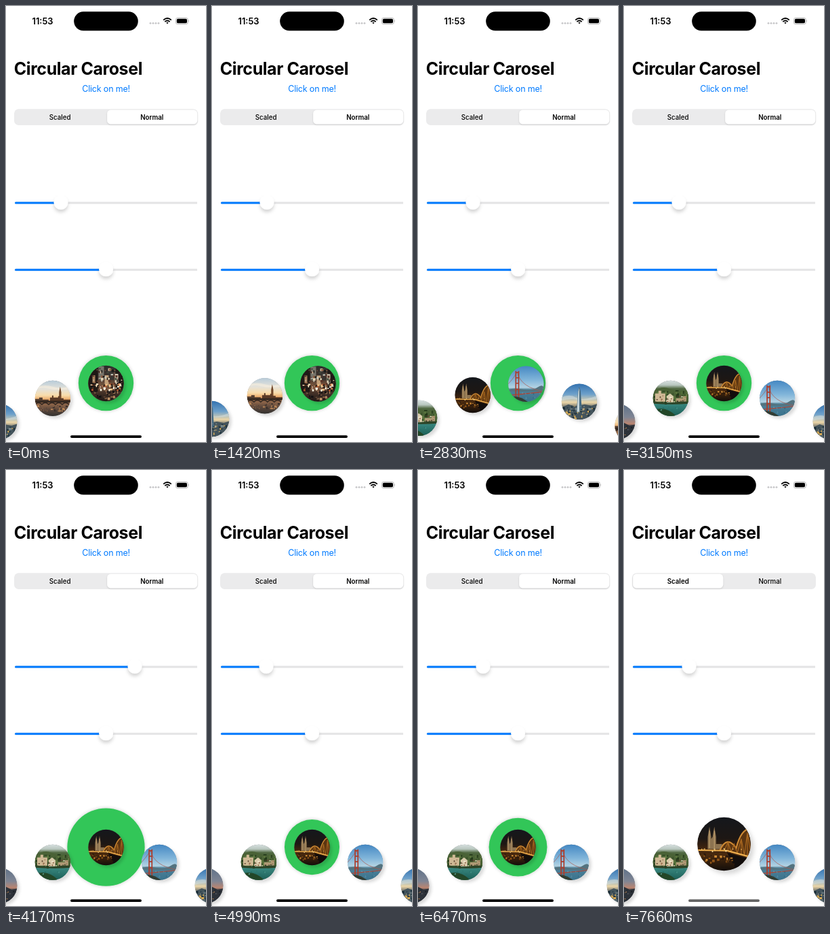
An HTML page that plays this animation: 295 by 640 pixels, repeating every 8 s.

```html
<!DOCTYPE html>
<html lang="en">
<head>
<meta charset="utf-8">
<title>Circular carousel</title>
<style>
  html, body { margin: 0; width: 100%; height: 100%; overflow: hidden; background: #fff; }
  svg { display: block; width: 100vw; height: 100vh; font-family: Inter, Roboto, sans-serif; }
  .title { font-size: 25px; font-weight: 700; letter-spacing: -.43px; }
  .link { font-size: 12.5px; letter-spacing: -.18px; fill: #007aff; }
  .clock { font-size: 12.9px; font-weight: 600; }
  .label { font-size: 9.75px; }
  .mid { text-anchor: middle; }
</style>
</head>
<body>
<svg id="stage" viewBox="0 0 295 640" preserveAspectRatio="none">
  <defs>
    <clipPath id="disc"><circle r="26.2"/></clipPath>
    <filter id="cast" x="-40%" y="-40%" width="180%" height="180%">
      <feDropShadow dx="3.5" dy="3.5" stdDeviation="2.2" flood-opacity=".15"/>
    </filter>
    <filter id="halo" x="-30%" y="-30%" width="160%" height="160%">
      <feDropShadow dx="0" dy="0" stdDeviation="2.6" flood-opacity=".22"/>
    </filter>
    <filter id="lift" x="-60%" y="-60%" width="220%" height="240%">
      <feDropShadow dx="0" dy="4" stdDeviation="2.8" flood-opacity=".17"/>
    </filter>
    <filter id="thin" x="-10%" y="-30%" width="120%" height="170%">
      <feDropShadow dx="0" dy="1" stdDeviation="1" flood-opacity=".16"/>
    </filter>
  </defs>

  <text class="clock mid" x="54" y="27">11:53</text>
  <rect x="100.2" y="8.3" width="94.6" height="28" rx="14"/>
  <g fill="#c6c6c8">
    <circle cx="213" cy="25.3" r="1.4"/><circle cx="217" cy="25.3" r="1.4"/>
    <circle cx="221" cy="25.3" r="1.4"/><circle cx="225" cy="25.3" r="1.4"/>
  </g>
  <g fill="none" stroke="#000" stroke-width="1.9">
    <path d="M232.2 20.6Q238 15.5 243.8 20.6"/>
    <path d="M234.3 23.1Q238 19.9 241.7 23.1"/>
    <path d="M236.3 24.4L238 26.3L239.7 24.4Q238 23 236.3 24.4Z" fill="#000" stroke="none"/>
  </g>
  <rect x="250.4" y="17.4" width="18" height="9.3" rx="2.9" fill="none" stroke="#a5a5a5" stroke-width=".8"/>
  <rect x="251.8" y="18.8" width="15.2" height="6.5" rx="1.7"/>
  <path d="M269.5 20.5q1.6 1.5 0 3z" fill="#a5a5a5"/>

  <text class="title" x="11.8" y="100.9">Circular Carosel</text>
  <text class="link mid" x="147.6" y="125.5">Click on me!</text>

  <rect x="12" y="151.2" width="271" height="23.8" rx="6.6" fill="#ebebec"/>
  <rect id="thumb" y="152.6" width="133" height="20.6" rx="5.3" fill="#fff" filter="url(#thin)"/>
  <text id="scaled" class="label mid" x="79.7" y="166.7">Scaled</text>
  <text id="normal" class="label mid" x="215.3" y="166.7">Normal</text>

  <g id="sliders"></g>
  <circle id="green" cx="147.5" cy="553.6" fill="#33c658" filter="url(#halo)"/>
  <g id="items"></g>
  <rect id="home" x="95" y="630.2" width="105" height="3.7" rx="1.85"/>
</svg>
<script>
const LOOP = 8000;
const BLUE = '#007aff';
const GAP = 78.6;
const $ = id => document.getElementById(id);
const set = (el, attrs) => { for (const k in attrs) el.setAttribute(k, attrs[k]); };
const rect = (x, y, w, h, fill) => `<rect x="${x}" y="${y}" width="${w}" height="${h}" fill="${fill}"/>`;
const path = (d, fill) => `<path d="${d}" fill="${fill}"/>`;
const line = (d, stroke, width) => `<path d="${d}" fill="none" stroke="${stroke}" stroke-width="${width}"/>`;

let gradients = 0;
function backdrop(...stops) {
  const id = 'bg' + gradients++;
  const marks = stops.map(([at, color]) => `<stop offset="${at}" stop-color="${color}"/>`).join('');
  return `<linearGradient id="${id}" x2="0" y2="1">${marks}</linearGradient>` +
    rect(-27, -27, 54, 54, `url(#${id})`);
}

let seed = 11;
const rand = () => (seed = seed * 16807 % 2147483647) / 2147483647;
function scatter(count, x, y, w, h, size, colors) {
  let out = '';
  for (let i = 0; i < count; i++) {
    out += rect((x + rand() * w).toFixed(1), (y + rand() * h).toFixed(1),
      (.6 + rand() * size).toFixed(1), (.6 + rand() * size).toFixed(1),
      colors[Math.floor(rand() * colors.length)]);
  }
  return out;
}

// Small landscapes, left to right along the carousel.
const scenes = [
  // city at dusk
  backdrop([0, '#5d7087'], [.38, '#7f8594'], [.56, '#bb8570'], [.62, '#4b464b'], [1, '#1d2128']) +
    path('M-27 8L-10 4L0 7L10 2L18 6L27 4V27H-27Z', '#2d3239') +
    scatter(34, -24, 6, 48, 16, 1.2, ['#c78950', '#57575f', '#171c23']),

  // old houses above a lake
  backdrop([0, '#dbe3e4'], [.14, '#b9c7bf'], [.24, '#4f6740'], [.58, '#3f5930'], [.63, '#3b8a82'], [1, '#1a5c54']) +
    path('M-27 -10Q-12 -19 -2 -14T27 -12V6H-27Z', '#4a6236') +
    scatter(60, -26, -12, 52, 17, 4, ['#2c4220', '#5f7a40', '#3b5429', '#223819']) +
    path('M-23 -7h5v-4h4v4h6v12h-15z', '#cfb995') + path('M-6 -3L-1 -7L4 -3V6H-6Z', '#d9cbab') +
    path('M8 0h10v-3h5v9H8z', '#b09a76') +
    scatter(30, -24, -5, 48, 11, 2, ['#5d4632', '#efe4cb', '#8e6244', '#3a3b24']) +
    path('M-27 4Q-10 8 5 6T27 5V8Q5 10 -27 8Z', '#2d4427') +
    path('M-27 17Q-12 13 -3 18T8 27H-27Z', '#234728') +
    scatter(12, -16, 10, 36, 9, 1.6, ['#62aaa1', '#257067']),

  // cathedral and lit bridge at night
  backdrop([0, '#14171c'], [.4, '#1d1714'], [.55, '#3a210f'], [.7, '#4a2a0e'], [1, '#100c0a']) +
    path('M-16 5V-7L-14.3 -17L-12.6 -7V-5L-11.2 -7L-9.5 -17L-7.8 -7V0H-2V5Z', '#8d7350') +
    line('M-14.3 -13V4M-9.5 -13V4', '#c3a271', .7) +
    path('M-4 6Q3 -9 12 3Q17 -16 27 -15V13Z', '#5b3511') +
    line('M-4 6Q3 -9 12 4Q17 -16 27 -15', '#cf8a34', 1.4) +
    line('M0 7L4 -2L7 8L10 0L13 9L17 -5L20 11L23 -11L27 12M4 -2V7M17 -5V10M23 -11V12', '#a8671f', .8) +
    line('M-26 6L3 6.5L27 13', '#f0b04e', 1.5) + path('M3 8.5L27 15V27H13Z', '#120d0b') +
    scatter(42, -25, 8, 34, 11, 2, ['#8f5418', '#cf8a34', '#2a180d', '#51300f']) +
    scatter(10, -25, 4, 46, 4, 1, ['#ffe4a0', '#ffca6a']),

  // red suspension bridge
  backdrop([0, '#4286c2'], [.4, '#82b6da'], [.6, '#b3d3e3'], [.65, '#4f8199'], [1, '#38728c']) +
    path('M-27 9Q-19 5 -5 8T17 5T27 7V11H-27Z', '#54737f') +
    line('M-27 1Q-21 -5 -13 -17Q-7 6 27 11', '#a85a50', .7) +
    line('M-27 17L27 11.5', '#a8483a', 1.4) +
    line('M-15 -19V22M-10.8 -19V21', '#ab3d2d', 1.7) +
    line('M-15 -17h4.4M-15 -9h4.4M-15 -1h4.4M-15 8h4.4', '#ab3d2d', 1.7) +
    path('M-27 20Q-14 16 -4 22L4 27H-27Z', '#323d33') +
    scatter(12, -8, 12, 32, 9, 1.6, ['#6797a9', '#2e637c']),

  // glass tower over a town
  backdrop([0, '#2f6fae'], [.3, '#6ea1cb'], [.52, '#ecd6a8'], [.62, '#8b8878'], [1, '#233641']) +
    path('M-27 -6Q-14 -12 -5 -6T27 -9V-4Q10 -1 -3 -3T-27 -1Z', '#d6dfe088') +
    path('M-27 9L-16 4L-7 7L8 4L18 6L27 3V27H-27Z', '#44545c') +
    path('M-4 16L-2 -15L0 -22L2 -15L4 16Z', '#476b82') + path('M-3.5 15L-1.5 -15L0 -20V15Z', '#c9d8dc') +
    scatter(75, -26, 6, 52, 18, 3, ['#253944', '#dcae55', '#7b8b8f', '#182b36', '#b4a684']),

  // river at sunset
  backdrop([0, '#b5cad9'], [.25, '#e4e2da'], [.42, '#f8dcab'], [.54, '#eaa866'], [.6, '#a5734f'], [.8, '#5d483c'], [1, '#30302f']) +
    path('M-27 -16Q-12 -21 0 -17T27 -18V-14Q9 -11 -5 -14T-27 -12Z', '#fff3dc77') +
    path('M9.4 5V-9L11 -17L12.6 -9V5Z', '#6f4629') +
    path('M-4 5V-1h3v-3h2v3h7v-2h2v3h6v2h11v3z', '#5a3a26') +
    path('M-27 5V1h7V-1h5v3h9v3z', '#523d30') + rect(-27, 3.6, 54, 2.8, '#33271f') +
    line('M-26 9Q-21 4 -16 9Q-11 4 -6 9Q-1 4 4 9Q9 4 14 9Q19 4 24 9', '#302620', 1.6) +
    scatter(30, -24, 10, 48, 9, 3, ['#b98556', '#43372f', '#8a6548', '#332c29']),

  // neon street at night
  backdrop([0, '#2b2c2c'], [.35, '#41342d'], [.6, '#8a5f42'], [.72, '#4a352a'], [1, '#1d1715']) +
    path('M-27 -27H-12V12H-27ZM14 -27H27V12H14Z', '#1f1916') +
    rect(-11, -25, 8, 20, '#77756b') + rect(2, -23, 9, 18, '#383532') +
    rect(-2, -12, 6, 14, '#c4a27b') + rect(13, -14, 5, 13, '#d9cdb5') + rect(-20, -12, 4, 11, '#a8805c') +
    scatter(70, -25, -23, 48, 26, 3.4, ['#e6d5b5', '#8c5d42', '#171816', '#c9c8ba', '#5b3529', '#43503f']) +
    scatter(48, -24, 0, 46, 9, 3, ['#fff0cc', '#f3c184', '#b3552f', '#f6f2e0', '#1c1512']) +
    scatter(36, -23, 10, 44, 12, 3.4, ['#141112', '#8e6549', '#352a26', '#bd9166'])
];
const items = scenes.map(art => {
  const g = document.createElementNS('http://www.w3.org/2000/svg', 'g');
  g.innerHTML = `<circle r="26" fill="#777" filter="url(#cast)"/><g clip-path="url(#disc)">${art}</g>`;
  return $('items').appendChild(g);
});

const slider = (y, x, name) => `${rect(13, y - 1.5, 269, 3, '#e4e4e5')}
  <rect id="${name}Fill" x="13" y="${y - 1.5}" width="${x - 13}" height="3" rx="1.5" fill="${BLUE}"/>
  <circle id="${name}Knob" cx="${x}" cy="${y - .7}" r="10.5" fill="#fff" filter="url(#lift)"/>`;
$('sliders').innerHTML = slider(289, 81, 'size') + slider(387.2, 147.6, 'space');

// Each move: first step, last step, values spread evenly between them.
const scroll = [
  [1420, 1770, [4.886, 4.42, 4.1, 4]],
  [2080, 2640, [3.85, 3.15, 2.42, 2.1, 2.02, 2]],
  [2830, 3150, [1.85, 1.4, 1.08, 1]]
];
const knob = [
  [3830, 4520, [88, 110, 145, 190, 230, 255, 262]],
  [4640, 5330, [246, 196, 130, 80, 46, 30, 26]],
  [5460, 5910, [40, 95, 165, 220, 238]],
  [6050, 6470, [225, 175, 125, 102, 96]]
];
const mode = [[7230, 7660, [.12, .5, .84, .97, 1]]];

function valueAt(moves, t, value) {
  for (const [from, to, steps] of moves) {
    if (t < from) break;
    const last = steps.length - 1;
    value = steps[Math.min(last, Math.floor((t - from) / (to - from) * last + .1))];
  }
  return value;
}

// How far an item sinks at a distance from the middle: a hyperbola.
const drop = d => Math.hypot(19.8, .466 * d) - 19.8;

function draw(t) {
  const center = valueAt(scroll, t, 5);
  const x = valueAt(knob, t, 81);
  const p = valueAt(mode, t, 0);

  items.forEach((g, i) => {
    const d = (i - 1 - center) * GAP;
    const grow = p * Math.max(0, 1 - Math.abs(d) / GAP);
    set(g, {
      transform: `translate(${147.5 + d} ${554 + drop(d) - 5 * grow}) scale(${1 + .5 * grow})`,
      visibility: Math.abs(d) > 200 ? 'hidden' : 'visible'
    });
  });
  set($('sizeFill'), { width: x - 13 });
  set($('sizeKnob'), { cx: x });
  set($('green'), { r: 40.7 + (x - 81) * .151, opacity: 1 - p });
  set($('thumb'), { x: 149.2 - 136 * p });
  set($('scaled'), { 'font-weight': p > .4 ? 600 : 450 });
  set($('normal'), { 'font-weight': p > .4 ? 450 : 600 });
  const gray = Math.round(100 * p);
  set($('home'), { fill: `rgb(${gray},${gray},${gray})` });
}

const start = performance.now();
function tick() {
  draw((performance.now() - start) % LOOP);
  requestAnimationFrame(tick);
}
tick();
</script>
</body>
</html>
```
